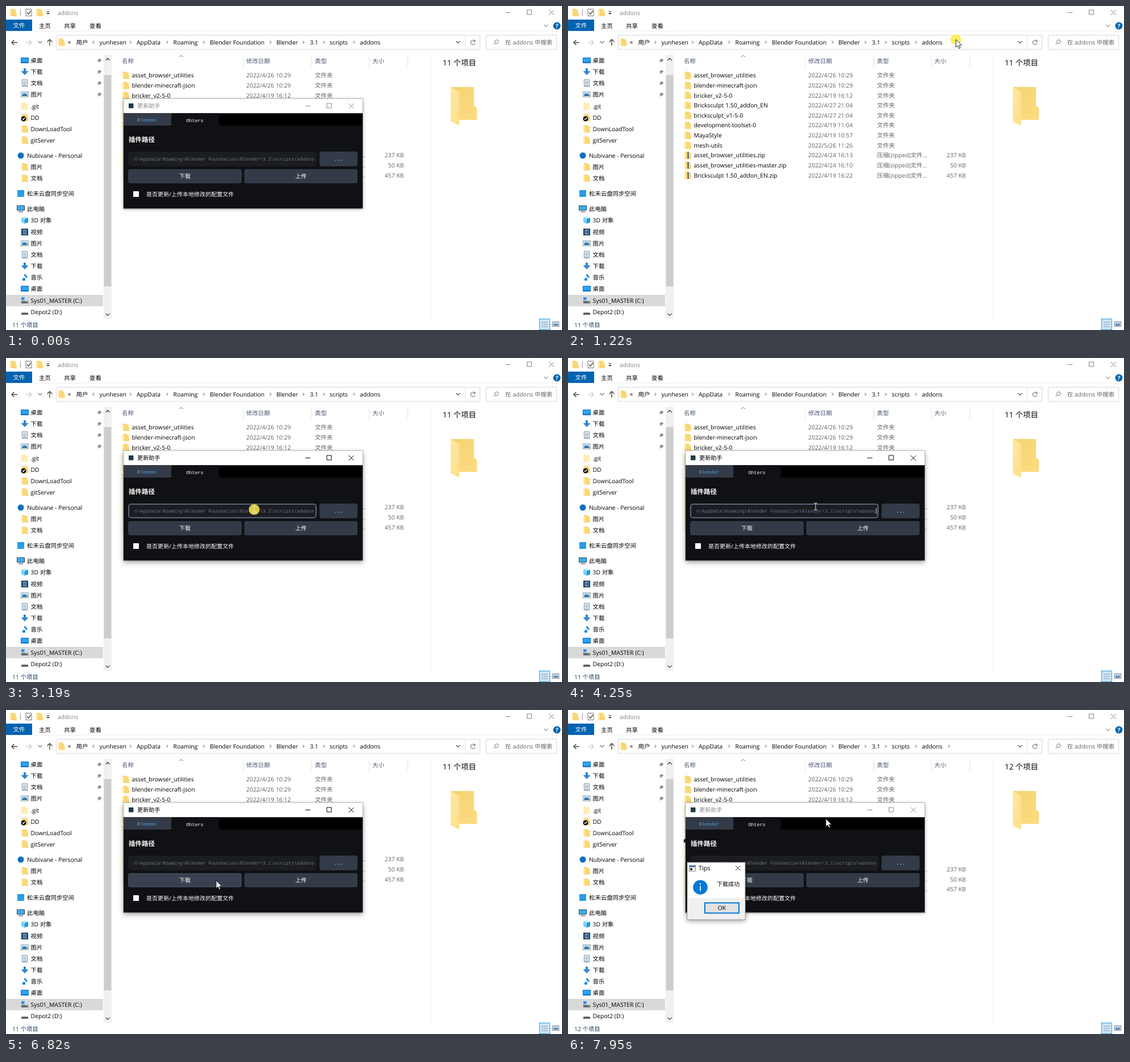
Recreate the animation shown at these times as an HTML page. Size 979x572 px, loop 8000 ms.

```html
<!DOCTYPE html>
<html lang="zh-CN">
<head>
<meta charset="utf-8">
<title>addons</title>
<style>
html, body { margin: 0; width: 100%; height: 100%; overflow: hidden; background: #fff; }
svg { display: block; width: 979px; height: 572px; }
text { font: 10.4px "Open Sans", "Noto Sans CJK SC", "Noto Sans CJK", sans-serif; fill: #000;
  white-space: pre; text-rendering: geometricPrecision; }
.dim { fill: #626262; }
.head { fill: #43566f; }
.song { font-size: 10.06px; fill: #fff; }
.mono { font: 8.4px "Liberation Mono", monospace; fill: #fff; }
.mid { text-anchor: middle; }
.end { text-anchor: end; }
.line { fill: none; stroke: #444; }
</style>
</head>
<body>
<svg id="stage" viewBox="0 0 979 572"></svg>
<script>
const LOOP = 8000, USER = 'yunhesen';
const stage = document.getElementById('stage');

const text = (x, y, s, cls = '', more = '') => `<text x="${x}" y="${y + 3.7}" class="${cls}" ${more}>${s}</text>`;
const rect = (x, y, w, h, fill, more = '') => `<rect x="${x}" y="${y}" width="${w}" height="${h}" fill="${fill}" ${more}/>`;
const line = (d, color = '#444', w = 1, more = '') => `<path class="line" d="${d}" style="stroke:${color};stroke-width:${w}" ${more}/>`;
const shape = (d, fill, more = '') => `<path d="${d}" fill="${fill}" ${more}/>`;
const dot = (x, y, r, fill, more = '') => `<circle cx="${x}" cy="${y}" r="${r}" fill="${fill}" ${more}/>`;
const group = (id, body) => `<g id="${id}">${body}</g>`;

const folder = (x, y, c = '#f9d774') =>
  shape(`M${x} ${y - 6.5}h7l1 1.5h2.5v5h1v6.5h-11.5z`, c) + shape(`M${x} ${y - 6.5}l2 1.5v11.5h-2z`, '#ffe9a6');

// Small icons, each centred on (x, y)
const icons = {
  desk: (x, y) => rect(x - 7, y - 5, 14, 10, '#0a6cc4') + rect(x - 6, y - 4, 12, 7, '#2aa4f4'),
  down: (x, y) => shape(`M${x - 2} ${y - 6}h4v5h4.5l-6.5 7l-6.5 -7h4.5z`, '#2f86d1'),
  doc: (x, y) => rect(x - 4.5, y - 6, 9, 12, '#fff', 'stroke="#7b8894"') +
    line(`M${x - 3} ${y - 3}h6m-6 2.5h6m-6 2.5h6m-6 2.5h6`, '#4d93c8'),
  pic: (x, y) => rect(x - 6.5, y - 4.5, 13, 9, '#fff', 'stroke="#8c979f"') +
    rect(x - 5, y - 3, 10, 3, '#8cc4ee') + shape(`M${x - 5} ${y + 3}v-2l4 -2l6 2v2z`, '#2c6a8e'),
  dir: (x, y) => folder(x - 5.5, y),
  pale: (x, y) => folder(x - 5.5, y, '#ffeeb5'),
  mark: (x, y) => folder(x - 5.5, y) + dot(x - 2, y + 2, 4.5, '#111') + line(`M${x - 4} ${y + 2}l1.5 1.5l3 -3.5`, '#fff', 1.2),
  blob: (x, y) => dot(x, y, 5.5, '#0f6fc5'),
  tile: (x, y) => rect(x - 6, y - 6, 12, 12, '#2a9bea'),
  pc: (x, y) => rect(x - 7, y - 6, 14, 9, '#3a4b58') + rect(x - 6, y - 5, 12, 7, '#38aef0') + rect(x - 4, y + 4, 8, 2, '#7c8a94'),
  cube: (x, y) => shape(`M${x - 6} ${y - 4}l6 -2l6 2v8l-6 2l-6 -2z`, '#1c9ad6') + shape(`M${x - 6} ${y - 4}l6 2v8l-6 -2z`, '#7fd3f2') +
    shape(`M${x - 6} ${y - 4}l6 -2l6 2l-6 2z`, '#b8e9f8'),
  film: (x, y) => rect(x - 6, y - 6, 12, 12, '#333b42') + rect(x - 3.5, y - 4.5, 7, 9, '#4b93d8') + rect(x - 3.5, y - .5, 7, 1, '#333'),
  note: (x, y) => shape(`M${x - 1} ${y - 6}h1.6q1 2.5 4 4.5q0 2 -1 3.5q-1 -3 -3 -3.5v5z`, '#1887d8') + dot(x - 1.5, y + 3.5, 2.6, '#1887d8'),
  sys: (x, y) => rect(x - 6, y + 1, 12, 4, '#5f666b') + rect(x + 2, y + 2.5, 3, 1, '#7ce05a') + rect(x - 6, y - 6, 5.5, 5.5, '#2a9bea'),
  disk: (x, y) => shape(`M${x - 5} ${y}h10l1 2h-12z`, '#c4c8ca') + rect(x - 6, y + 2, 12, 3, '#4f565b'),
};

const nav = [
  ['desk', '桌面', 96], ['down', '下载', 116], ['doc', '文档', 136], ['pic', '图片', 156],
  ['pale', '.git', 177], ['mark', 'DD', 197], ['dir', 'DownLoadTool', 217], ['dir', 'gitServer', 237],
  ['blob', 'Nubivane - Personal', 264, 1], ['dir', '图片', 284], ['dir', '文档', 304],
  ['tile', '松禾云盘同步空间', 331, 1], ['pc', '此电脑', 358, 1],
  ['cube', '3D 对象', 378], ['film', '视频', 399], ['pic', '图片', 419], ['doc', '文档', 439], ['down', '下载', 459],
  ['note', '音乐', 479], ['desk', '桌面', 499], ['sys', 'Sys01_MASTER (C:)', 520], ['disk', 'Depot2 (D:)', 540],
];

const files = [
  ['asset_browser_utilities', '4/26 10:29'], ['blender-minecraft-json', '4/26 10:29'],
  ['bricker_v2-5-0', '4/19 16:12'], ['Bricksculpt 1.50_addon_EN', '4/27 21:04'],
  ['bricksculpt_v1-5-0', '4/27 21:04'], ['development-toolset-0', '4/19 11:04'],
  ['MayaStyle', '4/19 10:57'], ['mesh-utils', '5/26 11:26'],
  ['asset_browser_utilities.zip', '4/24 16:13', 237], ['asset_browser_utilities-master.zip', '4/24 16:10', 50],
  ['Bricksculpt 1.50_addon_EN.zip', '4/19 16:22', 457],
];
const ROW = 17.65, rowY = i => 122.5 + i * ROW;

const fileRow = ([name, date, kb], i) => {
  const y = rowY(i);
  const zip = rect(210, y - 6, 3, 12, '#8a8f96') + line(`M211.5 ${y - 6}v12`, '#333', 1, 'stroke-dasharray="1.5 1"');
  return folder(205.5, y) + (kb ? zip : '') +
    text(221.5, y, name) + text(423, y, '2022/' + date, 'dim') +
    text(544, y, kb ? '压缩(zipped)文件...' : '文件夹', 'dim') + (kb ? text(700.5, y, kb + ' KB', 'dim end') : '');
};
const fileList = shifted => files.map((f, i) => fileRow(f, shifted && i > 5 ? i + 1 : i)).join('') +
  (shifted ? folder(205.5, rowY(6)) + dot(207.5, 231, 3.8, '#111') : '');

const crumb = (x, y = 64) => line(`M${x - 1.5} ${y - 2.5}l2.5 2.5l-2.5 2.5`, '#555');
const chevron = (x, y, c = '#555') => line(`M${x - 3.5} ${y - 2}l3.5 3.5l3.5 -3.5`, c, 1.2);
const controls = (x, y) =>
  `<path d="M${x - 4.5} ${y}h9M${x + 33.5} ${y - 4.5}h8v8h-8zM${x + 72} ${y - 4.5}l9 9m0 -9l-9 9" fill="none"/>`;

const crumbs = [[123.5, '用户'], [164.5, USER], [230, 'AppData'], [294.5, 'Roaming'], [359, 'Blender Foundation'],
  [476, 'Blender'], [535, '3.1'], [570, 'scripts'], [623, 'addons']];

const explorer = () =>
  // title bar
  folder(7, 11.5) + line('M25.5 6v11', '#888') + rect(35, 5.5, 10, 12, '#fff', 'stroke="#777"') +
  line('M37 11.5l2.5 3l4.5 -6', '#444', 1.3) + folder(53.5, 11.5) + line('M71.5 9.5h5', '#333') + shape('M71 12h6l-3 3z', '#333') +
  group('exTitle', text(91, 12, 'addons', '', 'style="fill:inherit"') + controls(884, 11.5)) +
  // ribbon
  rect(0, 24, 46, 20, '#0063b1') + text(12.5, 34.5, '文件', '', 'style="fill:#fff"') +
  [[58, '主页'], [102, '共享'], [147, '查看']].map(([x, s]) => text(x, 35, s)).join('') +
  line('M0 44.5H979', '#f0f0f0') + chevron(951, 35, '#999') + dot(970, 35, 6.5, '#0063b1') +
  text(970, 35, '?', 'mid', 'style="fill:#fff;font-weight:700"') +
  // address row
  line('M20 64.5H10m4.5 -4.5l-4.5 4.5l4.5 4.5', '#444', 1.3) + line('M35 64.5h10m-4.5 -4.5l4.5 4.5l-4.5 4.5', '#ccc', 1.3) +
  chevron(60, 64, '#777') + line('M77 70V59m-4.5 4.5l4.5 -4.5l4.5 4.5', '#444', 1.3) +
  rect(88.5, 51.5, 746, 25, '#fff', 'stroke="#d9d9d9"') + line('M808.5 52v24', '#e2e2e2') + folder(92, 64) +
  chevron(796, 64) + line('M825.5 62a4 4 0 1 0 .5 3.5M826 59.5v3h-3', '#555') +
  rect(845.5, 51.5, 124, 25, '#fff', 'stroke="#d9d9d9"') + line('M858.5 68.5l3 -3', '#777') +
  dot(863.8, 63, 3.3, 'none', 'stroke="#777"') + text(879, 64, '在 addons 中搜索', 'dim') +
  group('crumbs', text(109, 63, '«') + crumbs.map(([x, s]) => text(x, 64, s)).join('') +
    [154, 219.5, 284, 348.5, 466, 524, 560, 613].map(x => crumb(x)).join('')) +
  group('lastCrumb', crumb(671)) +
  group('edit', rect(0, 57, 0, 15, '#0078d7', 'id="pick"') +
    text(531.5, 64, `C:\\Users\\${USER}\\AppData\\Roaming\\Blender Foundation\\Blender\\3.1\\scripts\\addons`, 'end', 'id="full" style="fill:#fff"') +
    rect(532, 57, 1, 15, '#000', 'id="editCaret"')) +
  // navigation pane
  rect(0, 510, 171, 20, '#d9d9d9') +
  nav.map(([kind, name, y, top]) => icons[kind](top ? 26 : 33, y) + text(top ? 37 : 43.5, y, name)).join('') +
  [96, 116, 136, 156].map(y => shape(`M165 ${y - 3.5}l3.5 3.5l-1.5 .5l-2 2v1.5l-2 -2l-3 3l2.5 -3.5l-2 -2h1.5l2 -2z`, '#848b90')).join('') +
  rect(172, 86, 14, 466, '#f0f0f0') + rect(172.5, 122, 13, 373, '#cdcdcd') +
  line('M175.5 96l3.5 -3.5l3.5 3.5', '#444', 1.4) + chevron(179, 545, '#444') +
  // list
  rect(201, 0, 506, 17.6, '#e5f3ff', 'id="hoverRow"') +
  [[204, '名称'], [423, '修改日期'], [544, '类型'], [645, '大小']].map(([x, s]) => text(x, 97, s, 'head')).join('') +
  [417, 538, 639, 707].map(x => line(`M${x + .5} 86v23`, '#e5e5e5')).join('') + line('M305 90l3.5 -3l3.5 3', '#777') +
  group('list11', fileList(false)) + group('list12', fileList(true)) +
  // preview pane and status bar
  line('M748.5 86V552', '#ededed') +
  text(769, 101.5, '', '', 'id="total" style="font-size:13.4px"') + text(11, 563, '', '', 'id="status" style="fill:#1e395b"') +
  shape('M783 143h41v33l5 4v21h-30z', 'url(#back)') + shape('M783 143l15 9v59l-15 -7z', 'url(#front)') +
  rect(939.5, 552.5, 18, 19, '#cce8ff', 'stroke="#26a0da"') +
  [558, 562, 566].map(y => line(`M943 ${y}h3m1 0h3m1 0h3`, '#6d8494', 1.2)).join('') +
  rect(962.5, 557.5, 11, 8, '#fff', 'stroke="#777"') + rect(964, 559, 8, 3, '#8cc4ee') + rect(964, 562, 8, 2, '#2c6a8e');

const button = (id, x, y, w, h, label, cls, dy = 0) =>
  rect(x + 1, y + 1, w - 2, h - 2, '#343b48', `id="${id}" stroke="#343b48" stroke-width="2" rx="3"`) +
  text(x + w / 2, y + h / 2 + dy, label, cls + ' mid');

const helper = () =>
  group('frame', rect(207, 164, 421, 193.5, '#101114')) +
  rect(207, 164, 421, 25.5, '#fff') + rect(216, 172, 8.5, 8.5, '#1f3a48') +
  group('dlgTitle', text(231, 176, '更新助手', '', 'style="fill:inherit;font-size:10.2px"') + controls(531.5, 176.5)) +
  rect(207, 189.5, 421, 21.5, '#000') + rect(207, 189.5, 84, 21.5, '#343b48') + rect(291, 189.5, 84, 21.5, '#101114') +
  text(248.5, 200.5, 'Blender', 'mono mid', 'style="fill:#4ba3f0"') + text(332.5, 201, 'Ohters', 'mono mid') +
  text(216, 236, '插件路径', 'song', 'style="font-size:11.5px;font-weight:700"') +
  rect(216, 258, 330, 24, '#1b1d23', 'id="field" stroke-width="2" rx="4"') +
  rect(224.5, 265, 318, 10.5, '#0078d7', 'id="fieldPick"') + text(542.5, 269.5, '', 'mono end', 'id="path"') +
  rect(542.5, 264.5, 1, 11, '#ddd', 'id="caret"') +
  button('more', 552, 257, 67, 26, '...', 'mono', -.5) + button('get', 215, 288, 200, 25, '下载', 'song') +
  button('put', 419.5, 288, 199.5, 25, '上传', 'song') +
  rect(224, 327, 10, 10, '#fff', 'id="box" stroke-width="1.2"') + text(247, 332, '是否更新/上传本地修改的配置文件', 'song') +
  rect(206.5, 163.5, 422, 194.5, 'none', 'stroke="#777" stroke-opacity=".45"');

const tips = () =>
  rect(210, 269, 102, 101, '#fff', 'stroke="#888" style="filter:drop-shadow(0 2px 4px #0006)"') + rect(210.5, 332, 101, 37.5, '#f0f0f0') +
  rect(213.5, 274.5, 11, 10, '#fff', 'stroke="#888"') + rect(214, 275, 10, 2.5, '#3c7ab0') + rect(215, 279, 4, 4, '#444') +
  text(230, 279.5, 'Tips', '', 'style="font-size:11px"') + line('M295 275l8.5 8.5m0 -8.5l-8.5 8.5', '#222') +
  dot(233, 313, 12.8, '#0078d7') + rect(232.2, 310.5, 1.7, 9, '#fff') + dot(233, 307, 1.2, '#fff') +
  text(262, 307, '下载成功', 'song', 'style="fill:#000"') +
  rect(241, 340.5, 60, 18, '#e1e1e1', 'stroke="#0078d7" stroke-width="2"') + text(271, 349.5, 'OK', 'mid');

const gradient = (id, a, b) => `<linearGradient id="${id}" x2="1" y2="1"><stop stop-color="${a}"/><stop offset="1" stop-color="${b}"/></linearGradient>`;

stage.innerHTML = gradient('back', '#f6d272', '#fddc80') + gradient('front', '#ffe9a3', '#fcdf88') +
  explorer() + group('helper', helper()) + group('tips', tips()) +
  group('cursor', dot(0, .5, 9.5, '#fbec45', 'id="press" opacity=".85"') +
    shape('M0 0V14L3.2 11L5.5 16L7.8 15L5.6 10.3H10Z', '#fff', 'id="arrow" stroke="#111" stroke-width=".9"') +
    '<path id="beam" d="M-3 -6h2l1 1l1 -1h2M0 -5V5M-3 6h2l1 -1l1 1h2" fill="none"/>');

const el = {};
stage.querySelectorAll('[id]').forEach(n => el[n.id] = n);
const set = (id, attrs) => { for (const k in attrs) el[id].setAttribute(k, attrs[k]); };
const show = (id, on) => { el[id].style.display = on ? '' : 'none'; };
const tint = (id, color) => {
  set(id, { fill: color });
  el[id].lastChild.setAttribute('stroke', color);
};

const width = el.full.getComputedTextLength();
set('pick', { x: 531.5 - width, width });

// Pointer moves: start, end, number of steps, from, to
const moves = [
  [330, 1090, 12, [619, 441], [683, 59]],
  [2290, 3050, 11, [452, 267], [437, 267]],
  [4250, 4810, 9, [436, 262], [430, 175]],
  [5010, 5780, 12, [427, 178], [290, 328]],
  [5920, 6270, 6, [291, 329], [370, 301]],
  [7560, 7950, 6, [374, 296], [454, 192]],
];
const pointer = t => {
  const m = moves.filter(m => t >= m[0]).pop();
  if (!m) return null;
  const [t0, t1, n, a, b] = m;
  const p = Math.min(1, Math.floor((t - t0) / (t1 - t0) * (n - 1) + .001) / (n - 1));
  const e = p * p * (3 - 2 * p);
  return a.map((v, i) => v + (b[i] - v) * e);
};
const within = (t, a, b) => t >= a && t < b;

function draw(t) {
  const at = pointer(t), [x, y] = at || [-99, -99];
  const inside = (x0, y0, x1, y1) => within(x, x0, x1) && within(y, y0, y1);
  const editing = within(t, 1290, 2290), open = !within(t, 1220, 2290);
  const active = within(t, 2290, 7490), done = t >= 7420;

  // explorer
  tint('exTitle', editing ? '#111' : '#808080');
  show('crumbs', !editing);
  show('edit', editing);
  show('editCaret', within(t, 1430, 1960));
  show('lastCrumb', done);
  show('list11', !done);
  show('list12', done);
  el.total.textContent = el.status.textContent = (done ? 12 : 11) + ' 个项目';
  const row = Math.floor((y - rowY(0)) / ROW + .5);
  show('hoverRow', t < 1220 && x > 201 && x < 707 && row >= 0 && row < 11 && !inside(207, 164, 628, 357));
  set('hoverRow', { y: rowY(row) - ROW / 2 });

  // helper window
  show('helper', open);
  el.frame.style.filter = active ? 'drop-shadow(0 3px 5px #0006)' : 'drop-shadow(0 1px 3px #0005)';
  tint('dlgTitle', active ? '#000' : '#8a8a8a');
  const overField = active && inside(215, 257, 547, 283), focus = within(t, 3120, 6490);
  set('field', { stroke: focus ? '#5b657c' : overField ? '#404758' : '#1b1d23' });
  const picked = within(t, 3380, 3720);
  show('fieldPick', picked);
  el.path.style.fill = picked ? '#fff' : '#70747d';
  el.path.textContent = 'n\\AppData\\Roaming\\Blender Foundation\\Blender\\' + (t < 3720 ? '3.2\\scripts/addons' : '3.1\\scripts\\addons');
  show('caret', t >= 4250 && focus && Math.floor((t - 4250) / 530) % 2 === 0);
  const overGet = active && inside(215, 288, 415, 313), down = within(t, 6420, 6630);
  set('get', { fill: down ? '#232831' : overGet ? '#394150' : '#343b48', stroke: down ? '#2b323d' : overGet ? '#3d4656' : '#343b48' });
  set('box', { stroke: active && inside(220, 321, 408, 345) ? '#1c86e0' : 'none' });
  show('tips', t >= 7490);

  // pointer
  show('cursor', at);
  set('cursor', { transform: `translate(${x} ${y})` });
  show('press', within(t, 1220, 1360) || within(t, 3120, 3260) || within(t, 6420, 6560));
  const beam = overField || editing;
  show('beam', beam);
  show('arrow', !beam);
  set('beam', { stroke: editing ? '#111' : '#e4e4e4' });
}

const begin = performance.now();
const tick = () => {
  draw((performance.now() - begin) % LOOP);
  requestAnimationFrame(tick);
};
tick();
</script>
</body>
</html>
```
